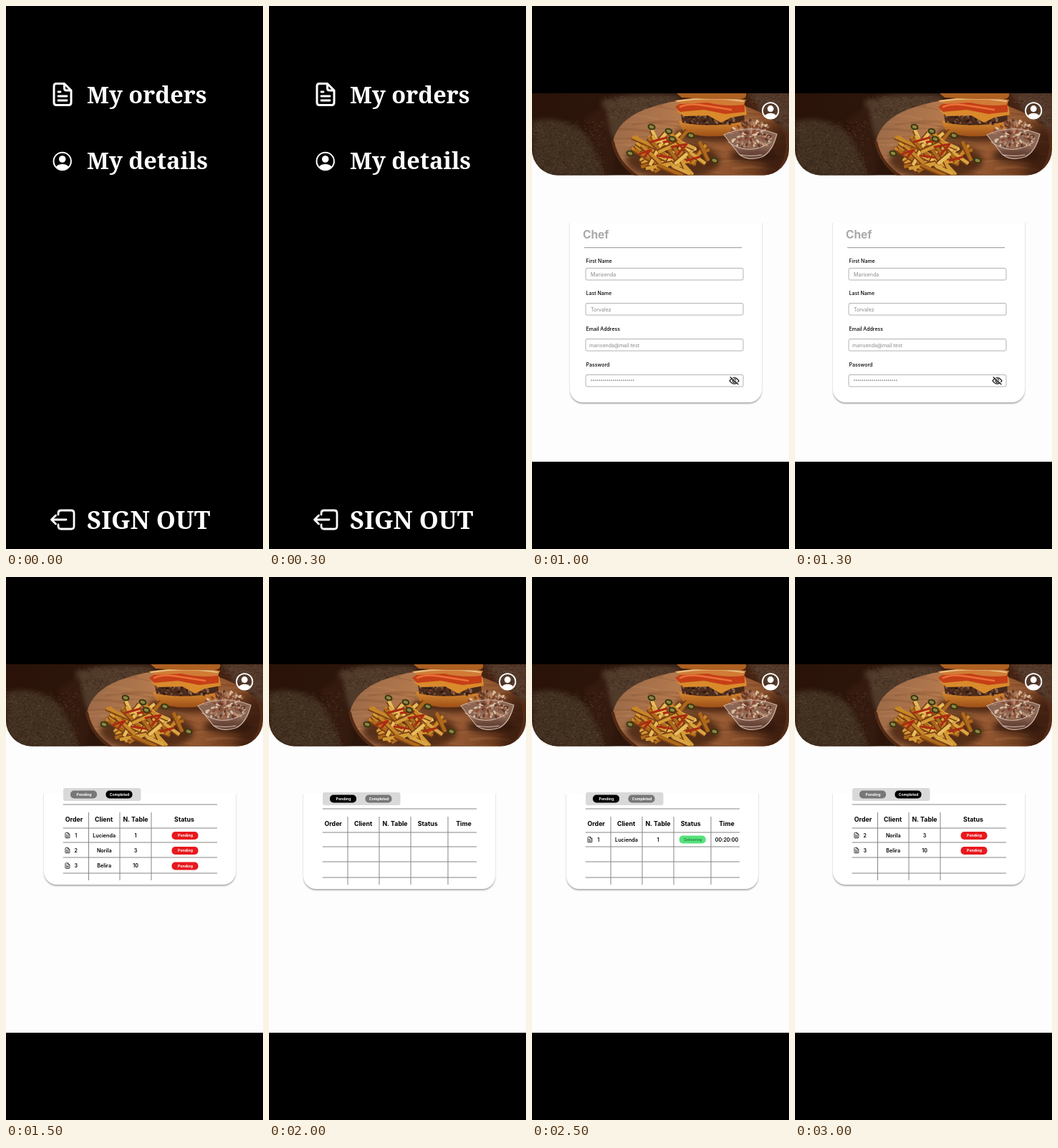
Recreate the animation shown at these times as an HTML page with a canvas. Size 359 by 759 pixels, loop 3.5 s.

```html
<!DOCTYPE html>
<html lang="en">
<head>
<meta charset="utf-8">
<title>Restaurant app screens</title>
<style>
html, body { margin: 0; width: 100%; height: 100%; overflow: hidden; background: #000; }
canvas { display: block; width: 359px; height: 759px; }
</style>
</head>
<body>
<canvas id="stage" width="359" height="759"></canvas>
<script>
const ctx = document.getElementById('stage').getContext('2d');
const SANS = 'Inter, "Open Sans", sans-serif';
const SERIF = '"Noto Serif", serif';
const SCREEN_MS = 500;
const PAPER = '#fdfdfd';

function seeded(seed) {
  return () => (seed = (seed * 16807) % 2147483647) / 2147483647;
}

function rect(x, y, w, h, fill) {
  ctx.fillStyle = fill;
  ctx.fillRect(x, y, w, h);
}

function pill(x, y, w, h, r, fill) {
  ctx.beginPath();
  ctx.roundRect(x, y, w, h, r);
  ctx.fillStyle = fill;
  ctx.fill();
}

function disc(x, y, rx, fill, ry = rx, turn = 0) {
  ctx.beginPath();
  ctx.ellipse(x, y, rx, ry, turn, 0, 7);
  ctx.fillStyle = fill;
  ctx.fill();
}

function shape(d, fill) {
  ctx.fillStyle = fill;
  ctx.fill(new Path2D(d));
}

function stroke(d, color, width = 1) {
  ctx.strokeStyle = color;
  ctx.lineWidth = width;
  ctx.lineCap = ctx.lineJoin = 'round';
  ctx.stroke(new Path2D(d));
}

function text(s, x, y, size, { weight = 400, family = SANS, color = '#000', align = 'left', style = '' } = {}) {
  ctx.font = `${style} ${weight} ${size}px ${family}`;
  ctx.fillStyle = color;
  ctx.textAlign = align;
  ctx.fillText(s, x, y);
}

const centred = (s, x, y, size, weight = 700, color = '#000') =>
  text(s, x, y, size, { weight, color, align: 'center' });

function gradient(x0, y0, x1, y1, ...colors) {
  const g = ctx.createLinearGradient(x0, y0, x1, y1);
  colors.forEach((c, i) => g.addColorStop(i / (colors.length - 1), c));
  return g;
}

function at(x, y, scale, draw) {
  ctx.save();
  ctx.translate(x, y);
  ctx.scale(scale, scale);
  draw();
  ctx.restore();
}

function blurred(px, draw) {
  ctx.save();
  ctx.filter = `blur(${px}px)`;
  draw();
  ctx.restore();
}

function inside(d, draw) {
  ctx.save();
  ctx.clip(new Path2D(d));
  draw();
  ctx.restore();
}

function speckle(seed, count, x, y, w, h, size, colors) {
  const rnd = seeded(seed);
  for (let i = 0; i < count; i++) {
    const r = size * (.4 + rnd() * .6);
    disc(x + rnd() * w, y + rnd() * h, r, colors[i % colors.length], r * .65, rnd() * 3);
  }
}

// Icons
function fileIcon(x, y, scale, color) {
  at(x, y, scale, () => {
    stroke('M16 1.5H5Q1.5 1.5 1.5 5V28Q1.5 31.5 5 31.5H22Q25.5 31.5 25.5 28V11L16 1.5V8Q16 11 19 11H25', color, 3);
    stroke('M7.5 19H19.5M7.5 25H19.5M7.5 13H10.5', color, 2.8);
  });
}

function userIcon(x, y, scale) {
  at(x, y, scale, () => {
    stroke('M12.2 0A12.2 12.2 0 1 1 -12.2 0A12.2 12.2 0 1 1 12.2 0', '#fff', 2);
    disc(0, -3, 4.8, '#fff');
    shape('M-9 8C-6 2.5 6 2.5 9 8C5 13 -5 13 -9 8Z', '#fff');
  });
}

function hiddenEye(x, y) {
  const eye = 'M-6.5 0Q0 -8.5 6.5 0Q0 8.5 -6.5 0ZM2.2 0A2.2 2.2 0 1 1 -2.2 0A2.2 2.2 0 1 1 2.2 0';
  at(x, y, 1, () => {
    stroke(eye, '#111', 1.2);
    stroke('M-5 -5.5L6 4.5', '#fff', 2);
    stroke('M-5.5 -5L5.5 5', '#111', 1.2);
  });
}

// Menu
function menu() {
  const label = (s, y, size) => text(s, 113, y, size, { weight: 700, family: SERIF, color: '#fff' });
  fileIcon(65.5, 107, 1, '#fff');
  label('My orders', 136, 32.5);
  userIcon(78.7, 217, 1);
  label('My details', 228, 32.5);
  stroke('M73 711V709Q73 705 77 705H91Q95 705 95 709V727Q95 731 91 731H77Q73 731 73 727V725', '#fff', 2.8);
  stroke('M84 718H63.5M69.5 712L63.5 718L69.5 724', '#fff', 2.8);
  label('SIGN OUT', 730.5, 34.5);
}

// Login
function seeds() {
  const rnd = seeded(77);
  for (let i = 0; i < 75; i++) {
    const x = 226 + rnd() * 132;
    const top = 316 + ((310 - x) / 84) ** 2 * 40;
    const y = top + 2 + rnd() ** 1.5 * 52;
    disc(x, y, 2.7, rnd() < .42 ? '#201813' : '#ecd5a8', 1.7, rnd() * 3);
  }
}

function lettuce() {
  const rnd = seeded(12);
  shape('M165 408Q175 383 193 386Q201 400 214 407Q285 421 359 409V429Q349 421 342 433Q333 422 325 434Q315 424 305 433Q296 424 288 437Q279 430 273 442Q264 435 257 446Q249 434 240 440Q235 430 228 434Q219 419 207 419Q191 407 165 408Z', '#34531f');
  for (let i = 0; i < 60; i++) {
    const x = 194 + rnd() * 162, y = 411 + rnd() * 17 + (x < 220 ? -6 : 0);
    stroke(`M${x} ${y}q4 -5 6 3t5 6`, ['#7d9d42', '#23361a', '#55792e'][i % 3], 1 + rnd() * 1.5);
  }
  stroke('M169 405Q180 394 192 393', '#70943e', 2);
}

function topBun() {
  const bun = 'M195 403C197 358 239 317 309 315Q337 313 359 322V412Q306 421 246 413Q198 418 195 403Z';
  shape(bun, gradient(240, 315, 270, 420, '#d79756', '#cb7b34', '#bd6826', '#a5571d', '#75370f'));
  inside(bun, () => blurred(8, () => {
    disc(286, 349, 44, '#e4a46499', 13, -.3);
    disc(222, 374, 12, '#dc924f88', 22, .55);
    rect(195, 407, 170, 14, '#5e2b0d99');
    disc(350, 374, 24, '#a5561c77', 28);
  }));
  seeds();
}

function fillings() {
  shape('M193 434Q230 424 359 428V498H206Q184 470 193 434Z', '#75452a');
  speckle(41, 65, 192, 430, 38, 54, 6, ['#c99270', '#8c4c34', '#d8af88', '#aa6b49']);
  disc(207, 428, 12, '#b79086', 6, .3);

  const patty = 'M274 465Q290 453 359 454V484Q325 492 281 487Q270 477 274 465Z';
  shape(patty, '#4b3934');
  inside(patty, () => speckle(31, 230, 273, 454, 90, 34, 2.6, ['#291f1e', '#66534d', '#3f302c', '#8b746a', '#4d3831']));

  disc(269, 445, 43, '#bd351d', 15, -.08);
  disc(350, 436, 22, '#cf3d20', 13);
  stroke('M232 451Q268 440 309 441M334 433Q347 428 359 432', '#ec6849', 2);
  const cheese = 'M205 463Q229 453 258 459Q298 453 316 439Q334 430 359 449V463Q337 455 317 466Q296 458 280 464Q260 466 250 475Q241 480 242 493Q237 503 230 497Q222 481 209 484Q201 475 205 463Z';
  shape(cheese, gradient(0, 438, 0, 500, '#f1b735', '#df9112'));
  stroke('M214 464Q234 460 253 464M323 442Q337 438 351 450', '#ffcf62', 2);
}

function bottomBun() {
  const bun = 'M190 500Q220 492 359 498V526Q340 530 270 529Q212 528 193 514Q187 506 190 500Z';
  shape(bun, gradient(0, 496, 0, 530, '#8f6438', '#ccb68e', '#c8b18a', '#87694a'));
  inside(bun, () => speckle(61, 150, 188, 498, 171, 32, 5, ['#d9c8a355', '#a9855855', '#b8996d55']));
  shape('M208 488Q240 480 280 487L359 484V500Q330 507 310 500Q260 503 204 496Z', '#9a683c');
  speckle(62, 100, 208, 486, 151, 15, 4, ['#d9c396', '#7b4928', '#bda077', '#945625']);
}

function burger() {
  blurred(6, () => disc(285, 528, 92, '#1a100bdd', 9));
  blurred(.5, () => {
    bottomBun();
    fillings();
    lettuce();
    topBun();
    shape('M312 239Q322 236 333 239L330 314L321 316L318 303L309 297Z',
      gradient(310, 0, 333, 0, '#ab8d5e', '#d7c292', '#b79b69'));
  });
}

function tableTop() {
  const rnd = seeded(9);
  blurred(3, () => rect(-10, 484, 380, 170,
    gradient(0, 482, 0, 650, '#514845', '#352a26', '#3c291f', '#63401f', '#59361e', '#3f2416', '#2c190f')));
  for (let i = 0; i < 130; i++) {
    const y = 500 + rnd() * 135, x = rnd() * 380 - 70;
    stroke(`M${x} ${y}q${30 + rnd() * 40} ${rnd() * 6 - 3} ${70 + rnd() * 90} 0`, i % 2 ? '#90603824' : '#140c0930', 1 + rnd() * 4);
  }
}

function windows() {
  blurred(11, () => {
    rect(203, 90, 85, 165, gradient(0, 122, 0, 258, '#8e8437', '#bcb252', '#aaa04a', '#575226'));
    rect(217, 128, 58, 82, '#d6cc70aa');
    rect(284, 90, 65, 165, gradient(0, 122, 0, 258, '#a9b09a', '#c5cfcf', '#b3bdbb', '#4c5250'));
    rect(295, 130, 42, 82, '#e6eef0aa');
    rect(347, 90, 30, 165, gradient(0, 122, 0, 258, '#b5aa51', '#8d853f', '#36351f'));
  });
}

function login() {
  ctx.save();
  ctx.beginPath();
  ctx.rect(0, 122, 359, 515);
  ctx.clip();
  rect(0, 122, 359, 515, gradient(0, 122, 0, 490, '#131316', '#171b20', '#1d242b', '#23282e'));
  blurred(18, () => {
    rect(-20, 150, 75, 115, '#1b1113');
    rect(160, 100, 35, 170, '#0d1216');
  });
  windows();
  tableTop();
  burger();
  ctx.restore();

  const title = { weight: 800, family: '"Open Sans", sans-serif', style: 'italic', color: '#fff', align: 'center' };
  text('Patmor', 110.5, 221, 43, title);
  text('Grove', 110, 275, 43, title);

  const hint = { family: SERIF, color: '#a3a3a3' };
  pill(29, 339, 137, 22, 11, '#fff');
  stroke('M34.5 349L37 346Q40.5 344 44 346L46.5 349V353Q46 355 44 355H37Q35 355 34.5 353ZM34.5 349L40.5 352L46.5 349M35.5 354.5L39 351.5M45.5 354.5L42 351.5', '#333', .8);
  text('Email', 52, 352.7, 6.8, hint);
  pill(29, 406, 137, 22, 11, '#fff');
  pill(36, 416, 8, 6.5, 1, '#000');
  stroke('M37.8 416V414.5A2.2 2.2 0 0 1 42.2 414.5V416', '#000', 1.2);
  text('Password', 52, 420, 6.5, hint);
  hiddenEye(155, 417);
  pill(63, 462.5, 70, 23.5, 11.5, '#fff');
  centred('Submit', 98, 477.6, 9);
}

// Inner pages
function fries() {
  const rnd = seeded(2024);
  const tones = ['#d9a543', '#c78628', '#e8bd5c', '#ad681b', '#d49a35'];
  blurred(5, () => disc(197, 216, 66, '#41200dcc', 27));
  for (let i = 0; i < 62; i++) {
    const a = rnd() * 6.3, reach = Math.sqrt(rnd());
    const x = 194 + Math.cos(a) * reach * 46, y = 205 + Math.sin(a) * reach * 27;
    ctx.save();
    ctx.translate(x, y);
    ctx.rotate(rnd() < .6 ? .35 + rnd() * .9 : 2 + rnd());
    const length = 23 + rnd() * 16;
    pill(-length / 2, -2, length, 5.6, 1, '#7c4015');
    pill(-length / 2, -2.8, length, 4.6, 1, tones[i % 5]);
    ctx.restore();
  }
  stroke('M150 207L166 201L157 211M166 190L188 184M195 197L216 193L204 207M216 216L234 211M175 209L195 212M184 190L202 188', '#ad2b12', 3);
  for (const [x, y] of [[137, 206], [167, 169], [191, 175], [196, 186], [222, 181], [255, 216]]) {
    disc(x, y, 5.6, '#343a12', 4.2, .3);
    disc(x, y, 3.4, '#948341', 2.2, .3);
  }
}

function smallBurger() {
  blurred(5, () => disc(254, 179, 54, '#3a1a0bcc', 11));
  shape('M205 161Q253 151 298 159Q300 177 280 180Q232 187 210 173Z', gradient(0, 160, 0, 183, '#d98c31', '#9a4c16'));
  shape('M208 151Q252 142 296 147L297 161Q252 171 210 163Z', '#49291a');
  speckle(55, 90, 211, 152, 72, 14, 2.4, ['#79513b', '#2d180f', '#966c50', '#5b3322']);
  shape('M202 147Q250 138 298 139L300 152L278 156L264 163L246 153L212 154Z', '#d98a2b');
  shape('M200 141Q213 130 245 134L297 137V148L270 151L240 145L207 148Z', '#c53f17');
  stroke('M207 141Q220 135 240 139L278 145', '#ed7138', 2.5);
  shape('M199 132Q250 124 299 131L296 138Q270 141 245 135L209 137Z', '#d17c36');
  stroke('M203 133Q248 126 295 133', '#e5c083', 2);
  shape('M202 122H299Q301 129 291 130Q250 131 209 128Z', '#ad6021');
}

function sauceBowl() {
  blurred(4, () => disc(310, 209, 34, '#2c140acc', 9));
  const bowl = 'M268 180Q304 164 342 179Q336 204 321 211Q303 217 290 208Z';
  shape(bowl, '#8b6654');
  const rnd = seeded(88);
  for (let i = 0; i < 130; i++) {
    const a = rnd() * 6.3, r = Math.sqrt(rnd());
    disc(306 + Math.cos(a) * r * 29, 180 + Math.sin(a) * r * 20, 1.3 + rnd() * 2.4,
      ['#b68b6e', '#63392a', '#dabd9f', '#8f4933', '#a47357'][i % 5], 1.6, a);
  }
  inside(bowl, () => blurred(3, () => disc(310, 209, 34, '#5b392dbb', 9)));
  stroke(bowl, '#cbb3a3', 1.2);
  stroke('M274 190Q303 211 334 190M291 208Q306 211 321 208', '#d6c1b2', 1);
}

function weave(x, y, w, h, seed) {
  const rnd = seeded(seed);
  for (let i = 0; i < w * h / 7; i++) {
    rect(x + rnd() * w, y + rnd() * h, 2, .9, i % 2 ? '#9b785838' : '#150a0645');
  }
}

function banner() {
  ctx.save();
  ctx.beginPath();
  ctx.roundRect(0, 122, 359, 114.5, [0, 0, 36, 36]);
  ctx.clip();
  rect(0, 122, 359, 115, gradient(0, 122, 359, 237, '#2a1208', '#2d170c', '#572c17'));
  blurred(3, () => {
    shape('M0 161Q40 151 75 177L100 210L104 240H0Z', '#423021');
    shape('M97 132Q145 119 210 126L188 146Q148 152 113 190L101 165Z', '#503a2a');
    shape('M72 158L102 139L116 212L112 237H102Z', '#351b0f');
    shape('M300 120H361V178L325 152Z', '#543a2b');
  });
  weave(0, 160, 102, 77, 5);
  weave(102, 126, 92, 30, 6);
  weave(303, 122, 56, 45, 7);
  const board = 'M113 189Q120 159 159 144Q205 127 255 131Q334 142 353 180Q361 208 338 237H143Q116 216 113 189Z';
  shape(board, gradient(125, 145, 335, 237, '#9c6a48', '#b4794d', '#9b5d35', '#633419'));
  inside(board, () => {
    const rnd = seeded(19);
    for (let i = 0; i < 50; i++) {
      stroke(`M${100 + rnd() * 220} ${135 + rnd() * 105}q30 -5 65 3`, i % 2 ? '#d09a6a22' : '#54291522', 1 + rnd() * 3);
    }
    blurred(9, () => disc(350, 210, 30, '#35190ebb', 45));
  });
  stroke('M113 190Q119 220 147 238', '#522a15', 4);
  blurred(.5, () => {
    smallBurger();
    fries();
    sauceBowl();
  });
  ctx.restore();
  userIcon(333.2, 146.3, .92);
}

function page() {
  rect(0, 122, 359, 515, PAPER);
  banner();
}

function card(x, bottom) {
  ctx.save();
  ctx.beginPath();
  ctx.rect(0, 303, 359, 300);
  ctx.clip();
  ctx.shadowColor = '#0000004d';
  ctx.shadowBlur = 2;
  ctx.shadowOffsetY = 2;
  pill(x, 270, 268, bottom - 271, 18, '#fff');
  ctx.restore();
}

function profile() {
  page();
  card(53, 555);
  text('Chef', 71, 325, 15.5, { weight: 700, color: '#a9a9a9' });
  rect(73, 337, 220, 1.3, '#aaa');
  const fields = [
    ['First Name', 359.3, 366.5, 'Marisenda', 82],
    ['Last Name', 403.7, 415.5, 'Torvalez', 82],
    ['Email Address', 453.7, 465.5, 'marisenda@mail.test', 80],
    ['Password', 503.7, 515.5, '', 82]
  ];
  for (const [name, baseline, top, value, x] of fields) {
    text(name, 75.5, baseline, 7, { weight: 500 });
    ctx.beginPath();
    ctx.roundRect(75, top, 220, 16.5, 2);
    ctx.strokeStyle = '#aaa';
    ctx.lineWidth = .9;
    ctx.stroke();
    text(value, x, top + 11, 7.1, { color: '#888' });
  }
  for (let i = 0; i < 22; i++) disc(83 + i * 2.8, 523.3, .95, '#999');
  hiddenEye(282.5, 523.8);
}

function badge(s, x, y, fill, color = '#fff', weight = 700) {
  pill(x, y, 37, 11, 5, fill);
  centred(s, x + 19, y + 7.4, 5.2, weight, color);
}

function orders({ x, y, columns, dividers, pendingFill, completedFill, rows }) {
  page();
  card(x - 27, y + 136);
  pill(x, y, 108.5, 18, 3, '#d9d9d9');
  badge('Pending', x + 10, y + 3.5, pendingFill);
  badge('Completed', x + 59.5, y + 3.5, completedFill);
  for (const dy of [22.5, 55.5, 75.5, 96.5, 118.5]) rect(x - .3, y + dy, 215.3, 1, '#858585');
  for (const dx of dividers) rect(x + dx, y + 34, 1, 95, '#858585');
  for (const [name, cx] of columns) centred(name, cx, y + 46.6, 8.8);

  rows.forEach(([id, client, table, status, time], i) => {
    const mid = y + [66, 87, 108.5][i];
    fileIcon(x + 2.5, mid - 4, .25, '#000');
    centred(id, x + 17.7, mid + 2.6, 7.1, 600);
    centred(client, columns[1][1] + .5, mid + 2.5, 7.2, 600);
    centred(table, columns[2][1], mid + 2.6, 7.1, 600);
    const left = columns[3][1] - (time ? 16 : 17.5);
    if (status === 'Pending') badge(status, left, mid - 5, '#e8191d');
    else badge(status, left, mid - 5.5, '#55e27a', '#26713c', 500);
    if (time) centred(time, columns[4][1], mid + 2.6, 7.1, 600);
  });
}

const clients = [
  ['1', 'Lucienda', '1', 'Pending'],
  ['2', 'Norila', '3', 'Pending'],
  ['3', 'Belira', '10', 'Pending']
];

const pending = rows => orders({
  x: 80, y: 295, rows, dividers: [35, 78.5, 122.5],
  columns: [['Order', 95], ['Client', 136.7], ['N. Table', 181], ['Status', 249]],
  pendingFill: '#777', completedFill: '#000'
});

const completed = rows => orders({
  x: 75, y: 301, rows, dividers: [34.5, 78.5, 122.5, 174.5],
  columns: [['Order', 89.7], ['Client', 131.5], ['N. Table', 176], ['Status', 221.7], ['Time', 272]],
  pendingFill: '#000', completedFill: '#777'
});

const screens = [
  menu,
  login,
  profile,
  () => pending(clients),
  () => completed([]),
  () => completed([['1', 'Lucienda', '1', 'Delivering', '00:20:00']]),
  () => pending(clients.slice(1))
];

let shown = -1;
function tick() {
  const next = Math.floor(performance.now() / SCREEN_MS) % screens.length;
  if (next !== shown) {
    shown = next;
    rect(0, 0, 359, 759, '#000');
    screens[next]();
  }
  requestAnimationFrame(tick);
}
tick();
</script>
</body>
</html>
```
